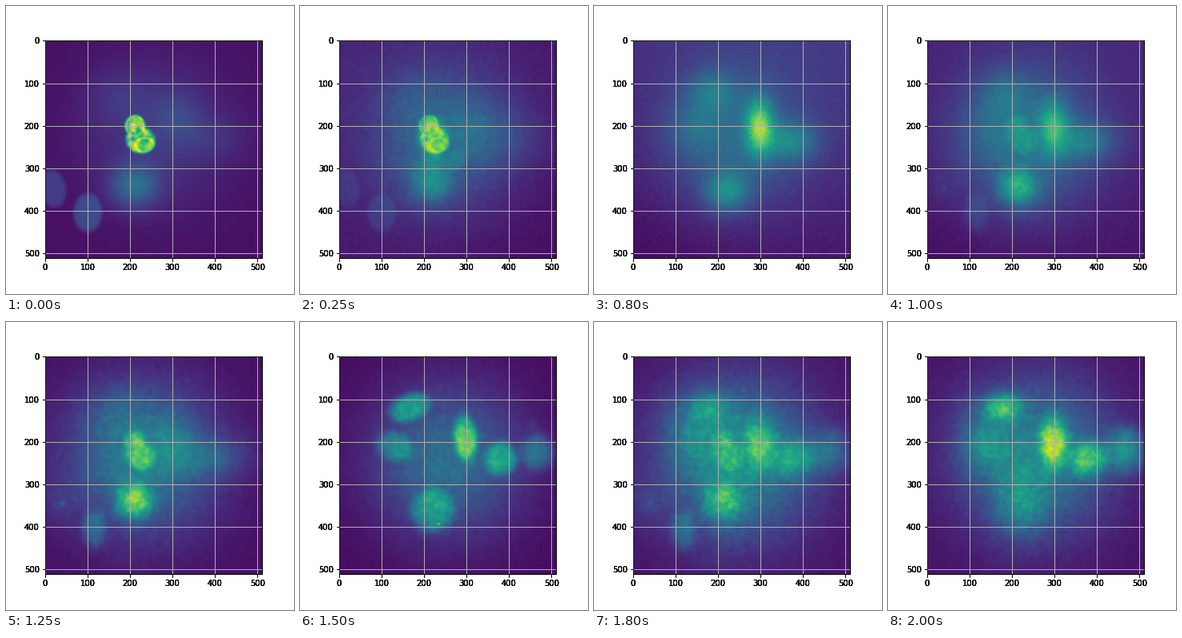
Animation, 360 px wide and 360 px high, one loop 2050 ms. Source, as a matplotlib script:

```python
import numpy as np
import matplotlib.pyplot as plt
from matplotlib.animation import FuncAnimation

SIZE, FRAMES, STEP = 512, 41, 50
Y, X = np.mgrid[0:SIZE, 0:SIZE].astype(float)


def radius2(x, y, rx, ry, angle=0):
    a = np.radians(angle)
    u = (X - x) * np.cos(a) + (Y - y) * np.sin(a)
    v = (Y - y) * np.cos(a) - (X - x) * np.sin(a)
    return (u / rx) ** 2 + (v / ry) ** 2


def blob(x, y, rx, ry, amp, sharp=1, angle=0):
    """Soft ellipse: Gaussian for sharp=1, flatter with a harder edge above."""
    return amp * np.exp(-radius2(x, y, rx, ry, angle) ** sharp)


def halo(x, y, sigma, amp, base, dx=0.0, dy=0.0):
    tilt = base + dx * (X / SIZE - 0.5) + dy * (Y / SIZE - 0.5)
    return tilt + blob(x, y, sigma * 2 ** 0.5, sigma * 2 ** 0.5, amp)


def texture(scale, seed):
    """Smooth random field with unit deviation."""
    f = np.fft.fftfreq(SIZE)
    low = np.exp(-2 * (np.pi * scale) ** 2 * (f[:, None] ** 2 + f ** 2))
    white = np.random.default_rng(seed).normal(size=(SIZE, SIZE))
    t = np.fft.ifft2(np.fft.fft2(white) * low).real
    return t / t.std()


def rim(x, y, rx, ry, amp, width=0.14):
    r = np.sqrt(radius2(x, y, rx, ry))
    return amp * np.exp(-((r - 0.86) / width) ** 2)


def main_nucleus(amp, sharp):
    return np.maximum(blob(211, 201, 25, 27, amp, sharp),
                      blob(224, 234, 36, 32, amp, sharp, 15))


def scene(back, *blobs):
    return back + sum(blob(*b) for b in blobs)


def sharp_nucleus():
    body = main_nucleus(1, 7)
    edges = np.maximum(rim(211, 201, 25, 27, 0.15), rim(234, 246, 25, 20, 0.2))
    return body * (0.58 + edges + 0.08 * texture(3.5, 4))


fine = 1 + 0.05 * texture(4, 9)

# (frame, image, noise level): focal planes the sweep passes through
PLANES = [
    (0, scene(halo(260, 220, 125, 0.12, 0.04),
              (210, 342, 55, 50, 0.27), (170, 130, 70, 60, 0.06),
              (310, 180, 60, 60, 0.09), (400, 230, 80, 50, 0.05),
              (100, 405, 34, 46, 0.17, 5), (17, 348, 31, 46, 0.13, 5, -10))
     + sharp_nucleus(), 0.02),
    (9, scene(halo(240, 235, 115, 0.4, 0.09, -0.06, -0.06),
              (220, 228, 38, 50, 0.3, 3), (220, 322, 46, 56, 0.24, 2),
              (277, 278, 24, 22, 0.12, 2), (365, 225, 110, 75, 0.11),
              (170, 140, 70, 60, 0.05)) * fine, 0.085),
    (16, scene(halo(235, 235, 120, 0.24, 0.1, 0.04, -0.11),
               (297, 203, 31, 62, 0.55), (220, 355, 50, 46, 0.3),
               (185, 120, 55, 48, 0.18), (372, 237, 60, 45, 0.25),
               (140, 205, 60, 60, 0.11)), 0.07),
    (25, scene(halo(228, 240, 120, 0.4, 0.04),
               (210, 340, 42, 42, 0.48, 1.4), (115, 405, 28, 44, 0.2, 2),
               (30, 345, 40, 50, 0.06), (40, 347, 6, 6, 0.13),
               (170, 130, 70, 60, 0.08), (385, 235, 90, 45, 0.16),
               (300, 185, 45, 60, 0.1)) * fine
     + main_nucleus(0.3, 2.5) * fine, 0.035),
    (30, scene(halo(255, 245, 120, 0.34, 0.03),
               (165, 120, 50, 32, 0.36, 2.5, -20),
               (130, 212, 44, 34, 0.24, 2.5, 20),
               (297, 192, 28, 54, 0.45, 2.5, -5),
               (380, 240, 38, 40, 0.36, 2.5), (465, 225, 40, 42, 0.25, 2),
               (455, 162, 12, 12, 0.06), (220, 360, 50, 52, 0.32, 2.5),
               (234, 394, 3, 3, 0.35)) * fine, 0.03),
    (33, scene(halo(235, 245, 130, 0.46, 0.05),
               (210, 340, 45, 44, 0.42, 1.6), (117, 408, 29, 46, 0.32, 2),
               (30, 345, 40, 50, 0.12), (40, 347, 6, 6, 0.13),
               (165, 145, 80, 65, 0.18), (390, 235, 95, 50, 0.22),
               (300, 190, 45, 65, 0.13)) * fine
     + main_nucleus(0.28, 2) * fine, 0.04),
    (40, scene(halo(255, 235, 122, 0.42, 0.05),
               (297, 200, 33, 60, 0.47, 1.5), (180, 120, 44, 32, 0.38, 1.3),
               (140, 130, 60, 50, 0.1), (378, 240, 42, 42, 0.42, 1.5),
               (465, 220, 48, 52, 0.34, 1.4), (130, 210, 55, 52, 0.22),
               (220, 350, 58, 75, 0.22)) * fine, 0.045),
]


def render(i):
    """Cross the two neighbouring planes and add fresh sensor noise."""
    for (a, low, na), (b, high, nb) in zip(PLANES, PLANES[1:]):
        if a <= i <= b:
            k = (i - a) / (b - a)
            img, level = low + (high - low) * k, na + (nb - na) * k
            break
    noise = np.random.default_rng(100 + i).normal(size=img.shape)
    return np.clip(img + noise * level * np.sqrt(np.clip(img, 0.03, 1) + 0.1), 0, 1)


BOX = [0.135, 0.125, 0.755, 0.755]
fig = plt.figure(figsize=(5, 5), dpi=72, facecolor="white")
ax = fig.add_axes(BOX)
im = ax.imshow(render(0), cmap="viridis", vmin=0, vmax=1, aspect="auto")

# Stacked frames of ticks and grid give the heavy, overdrawn labels
for n in range(6):
    top = ax if n == 0 else fig.add_axes(BOX, facecolor="none", label=f"grid{n}")
    top.set(xlim=(-0.5, SIZE - 0.5), ylim=(SIZE - 0.5, -0.5),
            xticks=range(0, 501, 100), yticks=range(0, 501, 100))
    top.grid(True, color="#b0b0b0", linewidth=0.8)


def update(i):
    im.set_data(render(i))
    return [im]


anim = FuncAnimation(fig, update, frames=FRAMES, interval=STEP,
                     repeat=True, repeat_delay=0, blit=False)
plt.show()
```
